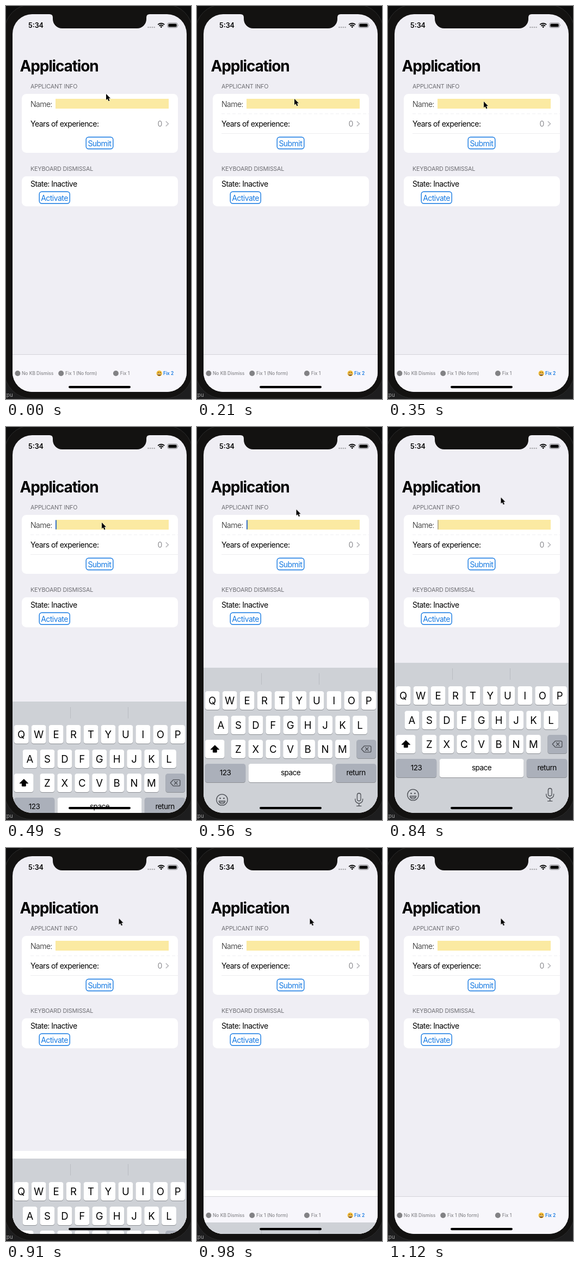
Animation, 340 px wide and 720 px high, one loop 1190 ms. Source, as an HTML page:

```html
<!DOCTYPE html>
<html lang="en">
<head>
<meta charset="utf-8">
<title>Application form</title>
<style>
  html, body { margin: 0; width: 100%; height: 100%; overflow: hidden; background: #121110; }
  svg { display: block; width: 340px; height: 720px; }
  text { font: 400 14px Inter, "Liberation Sans", sans-serif; letter-spacing: -.039em; }
  .mid { text-anchor: middle; }
  .title { font-size: 28px; font-weight: 700; letter-spacing: -.042em; }
  .head { font-size: 10.7px; letter-spacing: -.013em; fill: #6d6d72; }
  .thin { font-weight: 300; fill: #222; }
  .clock { font-size: 12.5px; font-weight: 600; letter-spacing: 0; }
  .blue { fill: #1579e2; }
  .box { fill: none; stroke: #1579e2; stroke-width: 1.4; }
  .tab { font-size: 8.4px; font-weight: 500; letter-spacing: 0; fill: #858589; }
  .tab.on { font-weight: 600; fill: #1579e2; }
  .letter { font-size: 18.5px; letter-spacing: 0; }
  .label { font-size: 13.5px; }
  .icon { fill: none; stroke: #4b4e54; stroke-width: 1.3; stroke-linecap: round; stroke-linejoin: round; }

  /* seventeen 70 ms ticks per loop */
  .anim { animation: 1190ms step-end infinite; }
  #keys { animation-name: keys; }
  #gap { animation-name: gap; }
  #caret { animation-name: caret; }
  #pointer { animation-name: pointer; }
  #rules { animation-name: rules; }

  @keyframes keys {
    0% { transform: translateY(290px); }
    41.176% { transform: translateY(71px); }
    47.058% { transform: translateY(9px); }
    52.941% { transform: translateY(0); }
    76.47% { transform: translateY(137px); }
    82.352% { transform: translateY(254px); }
    88.235% { transform: translateY(273px); }
    94.117%, 100% { transform: translateY(290px); }
  }
  @keyframes gap {
    0% { transform: translateY(720px); }
    76.47% { transform: translateY(555px); }
    82.352% { transform: translateY(627px); }
    88.235%, 100% { transform: translateY(720px); }
  }
  @keyframes caret {
    0% { opacity: 0; fill: #2463c4; }
    41.176% { opacity: 1; fill: #2463c4; }
    70.588% { opacity: 1; fill: #b5ad90; }
    76.47%, 100% { opacity: 0; fill: #b5ad90; }
  }
  @keyframes pointer {
    0% { transform: translate(184px, 161px); }
    11.764% { transform: translate(182px, 165px); }
    17.647% { transform: translate(179px, 170px); }
    23.529% { transform: translate(177px, 174px); }
    29.411% { transform: translate(176px, 175px); }
    47.058% { transform: translate(182.5px, 151px); }
    52.941%, 100% { transform: translate(207.5px, 129px); }
  }
  @keyframes rules {
    0% { opacity: 0; }
    11.764%, 100% { opacity: 1; }
  }
</style>
</head>
<body>
<svg viewBox="0 0 340 720">
  <defs>
    <clipPath id="screen"><rect x="12" y="15" width="320" height="692" rx="36"/></clipPath>
  </defs>

  <!-- phone body -->
  <rect width="340" height="720" fill="#0d0d0d"/>
  <rect y="660" width="340" height="60" fill="#1d1d1e"/>
  <rect x="-3" y="-3" width="346" height="722" rx="50" fill="#131211" stroke="#2b2b2b"/>
  <text x="-2" y="716" style="font-size:9.5px;letter-spacing:0" fill="#a5a5a5">tpu</text>

  <g clip-path="url(#screen)">
    <rect width="340" height="720" fill="#efeef4"/>

    <!-- status bar -->
    <text class="clock" x="41" y="40">5:34</text>
    <g fill="#aaaaae">
      <circle cx="261.5" cy="39" r="1.3"/><circle cx="265.2" cy="39" r="1.3"/>
      <circle cx="268.9" cy="39" r="1.3"/><circle cx="272.6" cy="39" r="1.3"/>
    </g>
    <g fill="none" stroke="#000" stroke-width="1.9">
      <path d="M279.2 34.2a8.5 8.5 0 0 1 12 0M281.5 36.6a5.2 5.2 0 0 1 7.4 0"/>
      <path d="M283.3 38l1.9 2.2 1.9-2.2a2.8 2.8 0 0 0-3.8 0z" fill="#000" stroke="none"/>
    </g>
    <rect x="297" y="31" width="18" height="8.6" rx="2.6" fill="none" stroke="#77777b" stroke-width=".9"/>
    <rect x="298.4" y="32.4" width="15.2" height="5.8" rx="1.5"/>
    <path d="M316.2 33.8q1.5 1.5 0 3z" fill="#77777b"/>

    <!-- form -->
    <text class="title" x="25.5" y="119.5">Application</text>
    <text class="head" x="45" y="150.5">APPLICANT INFO</text>
    <rect x="29" y="161" width="287" height="108" rx="8.5" fill="#fff"/>
    <g id="rules" class="anim" fill="none">
      <path d="M45 197.5H316" stroke="#efeff2" stroke-dasharray="6 4"/>
      <path d="M45 233.5H316" stroke="#ececef"/>
    </g>
    <text class="thin" x="45" y="185">Name:</text>
    <rect x="91" y="170" width="208" height="18" fill="#fbeaa2"/>
    <rect id="caret" class="anim" x="91" y="170.5" width="1.8" height="17"/>
    <text x="45" y="221">Years of experience:</text>
    <text x="278.5" y="221" fill="#8a8a8e">0</text>
    <path d="M293.8 211.2l4.6 4.5-4.6 4.5" fill="none" stroke="#b4b4b8" stroke-width="1.6"/>
    <rect class="box" x="147.2" y="240.2" width="49.6" height="21.6" rx="4.5"/>
    <text class="blue mid" x="171.8" y="257">Submit</text>

    <text class="head" x="45" y="301.5">KEYBOARD DISMISSAL</text>
    <rect x="29" y="312" width="287" height="55" rx="8.5" fill="#fff"/>
    <text x="45" y="331">State: Inactive</text>
    <rect class="box" x="61.2" y="340.2" width="56" height="21.6" rx="4.5"/>
    <text class="blue mid" x="89" y="356.5">Activate</text>

    <rect id="gap" class="anim" width="340" height="200" fill="#fff"/>

    <!-- tab bar -->
    <rect y="638" width="340" height="82" fill="#f7f6fb"/>
    <path d="M0 638.5H340" stroke="#d5d4d9"/>
    <g fill="#828285">
      <circle cx="21.4" cy="673" r="5"/><circle cx="101.2" cy="673" r="5"/><circle cx="201.9" cy="673" r="5"/>
    </g>
    <circle cx="281.7" cy="673" r="5.2" fill="#f5c03a"/>
    <path d="M278.2 673.8h7a3.5 3.5 0 0 1-7 0z" fill="#6b3e14"/>
    <path d="M278.7 674.1h6v1h-6z" fill="#fff"/>
    <g fill="#6b3e14"><circle cx="279.9" cy="671.3" r=".9"/><circle cx="283.5" cy="671.3" r=".9"/></g>
    <text class="tab" x="29" y="676">No KB Dismiss</text>
    <text class="tab" x="109" y="676">Fix 1 (No form)</text>
    <text class="tab" x="209.8" y="676">Fix 1</text>
    <text class="tab on" x="289" y="676">Fix 2</text>

    <!-- keyboard -->
    <g id="keys" class="anim">
      <rect y="432" width="340" height="290" fill="#ced1d6"/>
      <path d="M118.5 442V463M224.5 442V463" stroke="#b9bcc2"/>
      <g id="caps"></g>
      <path d="M32.8 574.2l7.8 7.6h-4.4v5.2h-6.8v-5.2h-4.4z" stroke="#000" stroke-linejoin="round"/>
      <g class="icon" stroke="#222">
        <path d="M307.5 575.3h10.3q2 0 2 2v7.4q0 2-2 2h-10.3l-5.3-5.7zM309.5 578.3l5.4 5.4M314.9 578.3l-5.4 5.4"/>
      </g>
      <g class="icon">
        <circle cx="46" cy="674" r="10.2"/>
        <path d="M40.3 676.2h11.4a5.7 5.1 0 0 1-11.4 0zM41 678.3h10"/>
        <rect x="294.4" y="662" width="6.6" height="14" rx="3.3"/>
        <path d="M290.8 672.5v1.2a6.9 6.9 0 0 0 13.8 0v-1.2M297.7 680.6v4.6M293.6 685.4h8.2"/>
      </g>
      <g fill="#4b4e54"><circle cx="42.6" cy="671.2" r="1.3"/><circle cx="49.4" cy="671.2" r="1.3"/></g>
    </g>
  </g>

  <path d="M80 14v1q6 0 6 6v3a17 17 0 0 0 17 17H241a17 17 0 0 0 17-17v-3q0-6 6-6v-1z" fill="#131211"/>
  <rect x="115" y="696" width="114" height="4.2" rx="2.1"/>
  <path id="pointer" class="anim" d="M0 0V11.2l2.6-2.3 1.9 4.3 2-.9-1.9-4.1H8z" stroke="#fff" stroke-width=".9" paint-order="stroke"/>
</svg>
<script>
  const caps = document.getElementById('caps');

  function add(tag, attrs, text = '') {
    const el = document.createElementNS('http://www.w3.org/2000/svg', tag);
    for (const name in attrs) el.setAttribute(name, attrs[name]);
    el.textContent = text;
    caps.append(el);
  }

  function key(x, y, width, text = '', { fill = '#fff', type = 'letter' } = {}) {
    const shape = { x, width, height: 34, rx: 4.2 };
    add('rect', { ...shape, y: y + 1, fill: '#8d9095' });
    add('rect', { ...shape, y, fill });
    const base = type === 'letter' ? 23.8 : 21;
    add('text', { x: x + width / 2, y: y + base, class: 'mid ' + type }, text);
  }

  const rows = [['QWERTYUIOP', 14.8, 475], ['ASDFGHJKL', 30.6, 520], ['ZXCVBNM', 62.4, 564]];
  for (const [letters, left, y] of rows) {
    [...letters].forEach((c, i) => key(left + i * 31.94, y, 26.8, c));
  }

  const grey = '#abb0ba';
  key(14.8, 564, 35.8);
  key(293.3, 564, 35.8, '', { fill: grey });
  key(14.8, 608, 74.4, '123', { fill: grey, type: 'label' });
  key(94.6, 608, 154.8, 'space', { type: 'label' });
  key(254.8, 608, 74.4, 'return', { fill: grey, type: 'label' });
</script>
</body>
</html>
```
